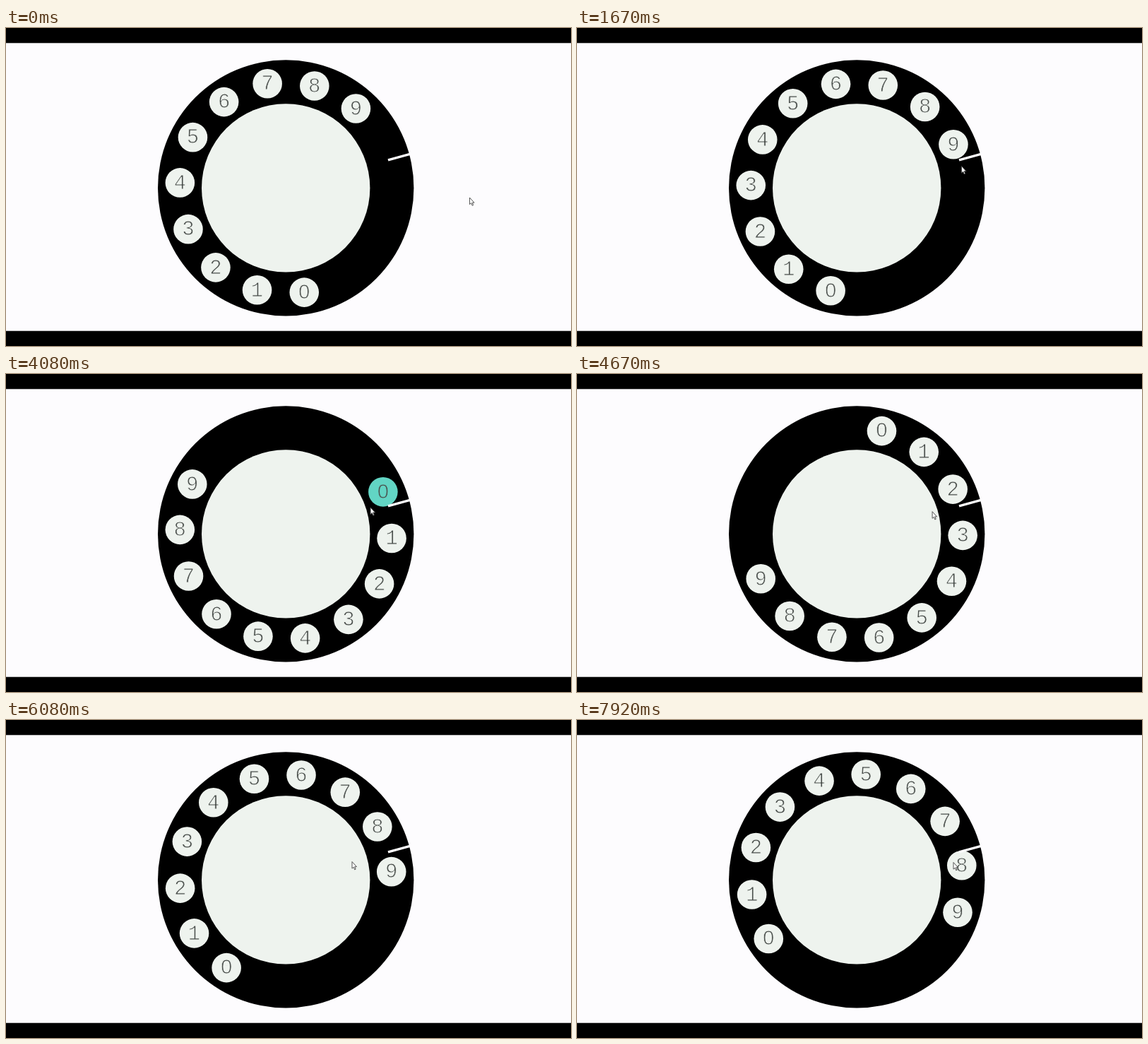
An HTML page with a canvas for the animation above (8 s loop, 800 by 450 pixels).

```html
<!DOCTYPE html>
<html lang="en">
<head>
<meta charset="utf-8">
<title>Rotary dial</title>
<style>
  html, body { margin: 0; width: 100%; height: 100%; overflow: hidden; background: #000; }
  canvas { display: block; width: 100vw; height: 100vh; }
</style>
</head>
<body>
<canvas id="stage" width="800" height="450"></canvas>
<script>
const ctx = document.getElementById('stage').getContext('2d');
const LOOP = 8000, STEPS = 96, STEP = LOOP / STEPS;
const CX = 396.2, CY = 226.4;
const OUTER = 181.2, INNER = 119.2, ORBIT = 150, HOLE = 20.8;
const FIRST = 80, SPACING = 360 / 14;
const STOP = 336.6;          // angle at which a dragged hole is held
const RETURN_SPEED = 0.1126; // degrees per ms
const PAPER = '#fdfcfe', PALE = '#eef3ee', TEAL = '#62d5c4', INK = '#4a4f4c';

// Each call: the pointer leaves its place, drags a digit to the stop, lets go
// and settles. grip holds the pointer's radius at both ends of the drag.
const HOME = [656.5, 240];
const calls = [
  { digit: 9, leave: 0, start: 880, end: 1540, release: 1659, settled: 1667, grip: [145, 160], rest: [544.5, 195.5] },
  { digit: 0, leave: 2335, start: 3085, end: 4070, release: 4196, settled: 6083, grip: [133, 126], rest: [490, 200.5] },
  { digit: 7, leave: 6600, start: 7090, end: 7744, release: 7826, settled: 7917, grip: [144, 140], rest: [533, 201.5] }
];

const lerp = (a, b, p) => a + (b - a) * p;
const mix = (a, b, p) => a.map((v, i) => lerp(v, b[i], p));
const smooth = p => p * p * (3 - 2 * p);
const easeOut = p => 1 - (1 - p) ** 2;
const progress = (t, from, to) => Math.min(1, Math.max(0, (t - from) / (to - from)));
const holeAngle = digit => FIRST + digit * SPACING;

function polar(deg, r) {
  const a = deg * Math.PI / 180;
  return [CX + r * Math.cos(a), CY + r * Math.sin(a)];
}

function pose(t) {
  const i = calls.findLastIndex(c => c.leave <= t);
  const call = calls[i];
  const travel = STOP - holeAngle(call.digit);
  const pull = smooth(progress(t, call.start, call.end));
  const turn = Math.max(0, travel * pull - RETURN_SPEED * Math.max(0, t - call.release));

  // The pointer runs slightly ahead of the hole it drags
  const gripAt = p => polar(holeAngle(call.digit) + travel * p + 3 + 3 * p, lerp(...call.grip, p));
  const origin = i ? calls[i - 1].rest : HOME;
  let pointer = gripAt(pull);
  if (t < call.start) {
    pointer = mix(origin, pointer, smooth(progress(t, call.leave, call.start)));
  } else if (t > call.end) {
    pointer = mix(pointer, call.rest, easeOut(progress(t, call.end, call.settled)));
  }

  const [hx, hy] = polar(holeAngle(call.digit), ORBIT);
  const hovered = Math.hypot(pointer[0] - hx, pointer[1] - hy) < HOLE;
  const active = t < call.release && (t >= call.start || hovered);
  return { turn, pointer, lit: active ? call.digit : -1 };
}

function disc(x, y, r, color) {
  ctx.fillStyle = color;
  ctx.beginPath();
  ctx.arc(x, y, r, 0, Math.PI * 2);
  ctx.fill();
}

function drawHole(digit, turn, color) {
  const [x, y] = polar(holeAngle(digit) + turn, ORBIT);
  const base = y + 8.8;
  disc(x, y, HOLE, color);
  ctx.fillStyle = INK;
  ctx.fillText(digit, x, base);
  // Thin the strokes and clear the dot inside the zero
  ctx.strokeStyle = color;
  ctx.lineWidth = 0.9;
  ctx.strokeText(digit, x, base);
  if (digit === 0) disc(x, y - 0.7, 3, color);
}

function drawStop() {
  ctx.strokeStyle = PAPER;
  ctx.lineWidth = 3.4;
  ctx.beginPath();
  ctx.moveTo(541, 186.8);
  ctx.lineTo(572, 178.3);
  ctx.stroke();
}

function drawPointer([x, y]) {
  const arrow = new Path2D('M0 0V9.6L2.2 7.7L3.7 11.3L5.2 10.6L3.7 7.2H6.5Z');
  ctx.save();
  ctx.translate(x, y);
  ctx.fillStyle = '#fff';
  ctx.fill(arrow);
  ctx.strokeStyle = '#444';
  ctx.lineWidth = 0.9;
  ctx.stroke(arrow);
  ctx.restore();
}

function draw(t) {
  const { turn, pointer, lit } = pose(t);

  ctx.fillStyle = '#000';
  ctx.fillRect(0, 0, 800, 450);
  ctx.fillStyle = PAPER;
  ctx.fillRect(0, 21.3, 800, 407.4);

  disc(CX, CY, OUTER, '#000');
  disc(CX, CY, INNER, PALE);

  ctx.font = '29px "Liberation Mono", monospace';
  ctx.textAlign = 'center';
  ctx.lineJoin = 'round';
  for (let n = 0; n < 10; n++) drawHole(n, turn, n === lit ? TEAL : PALE);
  drawStop();
  drawPointer(pointer);
}

function frame(now) {
  // The picture advances in steps; the small lead absorbs rounded times
  const step = Math.floor((now % LOOP + 3.4) / STEP);
  draw(Math.min(STEPS - 1, step) * STEP);
  requestAnimationFrame(frame);
}

draw(0);
requestAnimationFrame(frame);
</script>
</body>
</html>
```
